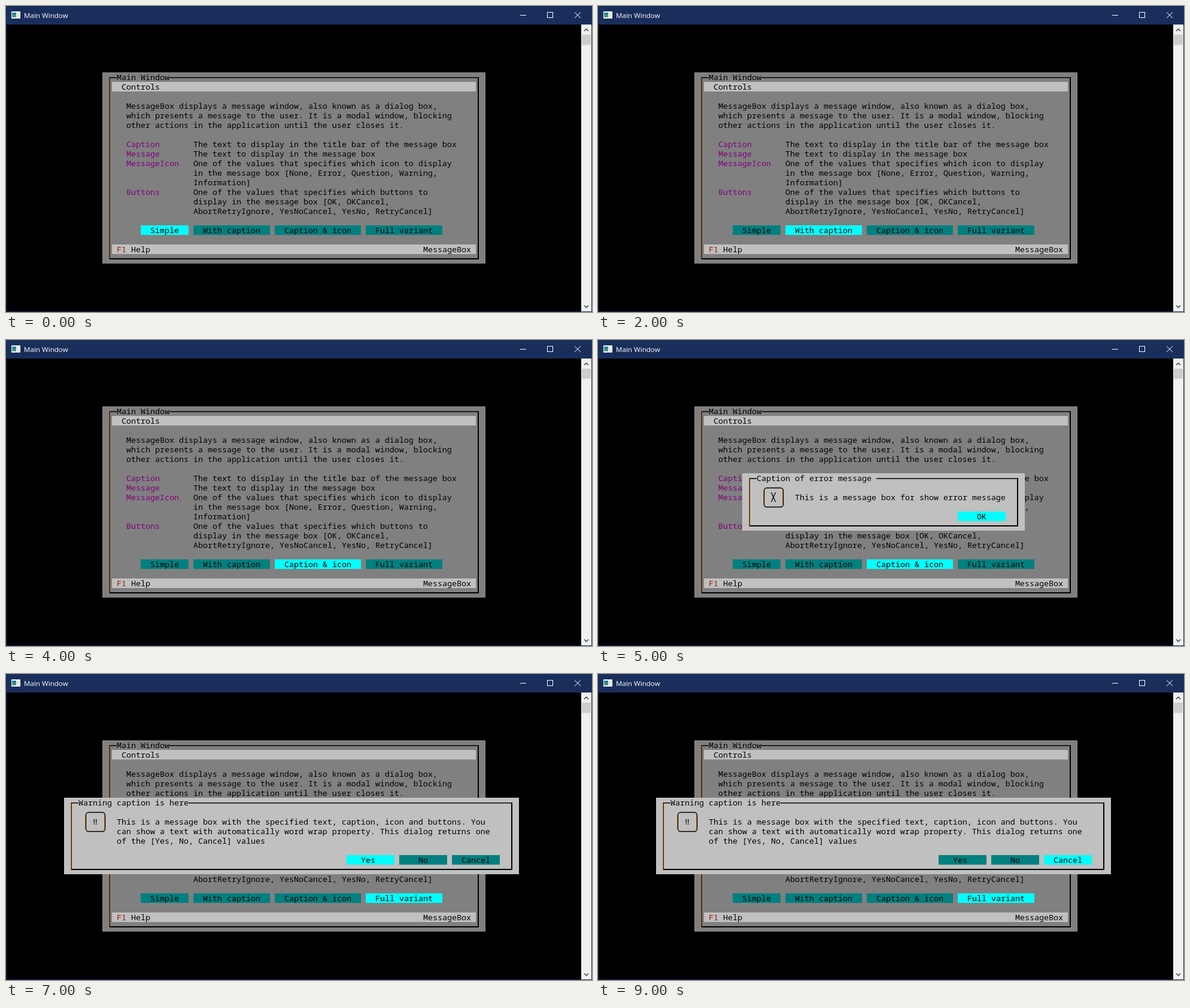
An HTML page that plays this animation: 979 px wide and 512 px high, repeating every 10 s.

```html
<!DOCTYPE html>
<html lang="en">
<head>
<meta charset="utf-8">
<title>Main Window</title>
<style>
  html, body { margin: 0; width: 100%; height: 100%; overflow: hidden; background: #000; }
  svg { display: block; }
  text { font: 13.333px "Noto Sans Mono", "DejaVu Sans Mono", monospace; white-space: pre; }
  .title { font: 11.6px "Open Sans", "Noto Sans", sans-serif; }
</style>
</head>
<body>
<svg id="stage" width="979" height="512" viewBox="0 0 979 512">
  <rect width="979" height="512" fill="#1a2e5c"/>
  <rect x="1" y="31" width="960" height="480"/>
  <g id="icon">
    <rect x="9" y="9" width="15" height="12" fill="#f4f6f8"/>
    <rect x="10" y="11" width="7" height="8" fill="#2f7f9c"/>
    <rect x="10" y="15" width="7" height="4" fill="#4a9a78"/>
    <path d="M18 12.5h5M18 15.5h5M18 18.5h5" stroke="#c3cad2"/>
  </g>
  <text class="title" x="30" y="20" fill="#fff">Main Window</text>
  <g fill="none" stroke="#fff">
    <path d="M859 15.5h10"/>
    <rect x="904.5" y="10.5" width="9" height="9"/>
    <path d="M950 10.5l10 9.6M960 10.5l-10 9.6"/>
  </g>
  <rect x="961" y="31" width="17" height="480" fill="#f0f0f0"/>
  <rect x="962" y="48" width="15" height="17" fill="#cdcdcd"/>
  <path d="M966 42l3.5-3.5 3.5 3.5M966 501l3.5 3.5 3.5-3.5" fill="none" stroke="#505050" stroke-width="1.7"/>
</svg>
<script>
const stage = document.getElementById('stage');
const GRAY = '#808080', SILVER = '#c0c0c0', TEAL = '#008080', CYAN = '#00ffff', PURPLE = '#800080';
const COLS = 120, ROWS = 30;
const px = col => 1 + 8 * col;
const py = row => 31 + 16 * row;

function add(parent, tag, attrs = {}) {
  const el = document.createElementNS(stage.namespaceURI, tag);
  for (const key in attrs) el.setAttribute(key, attrs[key]);
  return parent.appendChild(el);
}
const box = (parent, x, y, width, height, fill) => add(parent, 'rect', { x, y, width, height, fill });
const cells = (parent, col, row, w, h, fill) => box(parent, px(col), py(row), 8 * w, 16 * h, fill);

function print(parent, col, row, text, fill = '#000') {
  add(parent, 'text', { x: px(col), y: py(row) + 13, fill }).textContent = text;
}

function button(parent, col, row, width, label) {
  const face = cells(parent, col, row, width, 1, TEAL);
  print(parent, col + Math.floor((width - label.length) / 2), row, label);
  return face;
}

// Panel with a light top and left edge, a heavy bottom and right edge.
function panel(parent, col, row, w, h, fill, title) {
  cells(parent, col, row, w, h, fill);
  const left = px(col) + 12, top = py(row) + 8;
  const right = px(col + w) - 12, bottom = py(row + h) - 8;
  const edge = fill === GRAY ? '#804a00' : '#c07000';
  const titleEnd = title ? px(col + 3 + title.length) : left;
  box(parent, left - 1, top, 1, bottom - top + 1, edge);
  box(parent, left, top, 1, bottom - top + 1, '#301c00');
  if (title) box(parent, left, top, 12, 1.5, '#000');
  box(parent, titleEnd, top, right - titleEnd + 1, 1.5, '#000');
  box(parent, right - 1, top, 2, bottom - top + 1, '#000');
  box(parent, left, bottom - 1, right - left + 1, 2, '#000');
  print(parent, col + 3, row, title);
}

function messageIcon(parent, col, row, kind) {
  const x = px(col) + 4, y = py(row) + 8;
  add(parent, 'rect', { x: x + .5, y: y + .5, width: 32, height: 32, rx: 4.5,
    fill: 'none', stroke: '#000', 'stroke-width': 1.4 });
  box(parent, x - 1, y + 5, 1, 23, '#c07000');
  box(parent, x + 31, y + 5, 1, 23, '#c07000');
  if (kind === 'error') {
    add(parent, 'path', { d: `M${x + 12.5} ${y + 8}l7 16m0-16l-7 16`,
      stroke: '#000', 'stroke-width': 1.3 });
  } else {
    print(parent, col + 2, row + 1, '‼');
  }
}

function dialog({ title = '', lines, icon, buttons = ['OK'] }) {
  const g = add(stage, 'g');
  const indent = icon ? 11 : 4;
  const w = icon === 'warning' ? 95 : indent + lines[0].length + 4;
  const h = lines.length + 5;
  const col = Math.floor((COLS - w) / 2), row = Math.floor((ROWS - h) / 2);
  panel(g, col, row, w, h, SILVER, title);
  if (icon) messageIcon(g, col + 4, row + 1, icon);
  lines.forEach((line, i) => print(g, col + indent, row + 2 + i, line));
  const start = col + w - 3 - 11 * buttons.length;
  const faces = buttons.map((label, i) => button(g, start + 11 * i, row + h - 2, 10, label));
  return { g, faces };
}

panel(stage, 20, 5, 80, 20, GRAY, 'Main Window');
cells(stage, 22, 6, 76, 1, SILVER);
cells(stage, 22, 23, 76, 1, SILVER);
print(stage, 24, 6, 'Controls');
print(stage, 23, 23, 'F1', '#902000');
print(stage, 26, 23, 'Help');
print(stage, 87, 23, 'MessageBox');

[
  'MessageBox displays a message window, also known as a dialog box,',
  'which presents a message to the user. It is a modal window, blocking',
  'other actions in the application until the user closes it.'
].forEach((line, i) => print(stage, 25, 8 + i, line));

[
  ['Caption', 'The text to display in the title bar of the message box'],
  ['Message', 'The text to display in the message box'],
  ['MessageIcon', 'One of the values that specifies which icon to display'],
  ['', 'in the message box [None, Error, Question, Warning,'],
  ['', 'Information]'],
  ['Buttons', 'One of the values that specifies which buttons to'],
  ['', 'display in the message box [OK, OKCancel,'],
  ['', 'AbortRetryIgnore, YesNoCancel, YesNo, RetryCancel]']
].forEach(([name, about], i) => {
  if (name) print(stage, 25, 12 + i, name, PURPLE);
  print(stage, 39, 12 + i, about);
});

let nextCol = 28;
const menu = ['Simple', 'With caption', 'Caption & icon', 'Full variant'].map(label => {
  const face = button(stage, nextCol, 21, label.length + 4, label);
  nextCol += label.length + 5;
  return face;
});

const dialogs = [
  { lines: ['This is a simple message dialog'] },
  { title: 'Caption of message', lines: ['This is a message box with a given caption'] },
  { title: 'Caption of error message ', icon: 'error',
    lines: ['This is a message box for show error message'] },
  { title: 'Warning caption is here', icon: 'warning', buttons: ['Yes', 'No', 'Cancel'],
    lines: [
      'This is a message box with the specified text, caption, icon and buttons. You',
      'can show a text with automatically word wrap property. This dialog returns one',
      'of the [Yes, No, Cancel] values'
    ] }
].map(dialog);

// One second per step: [focused menu button, focused dialog button or -1 when closed]
const STEPS = [[0, -1], [0, 0], [1, -1], [1, 0], [2, -1], [2, 0], [3, -1], [3, 0], [3, 1], [3, 2]];
const focus = (faces, index) =>
  faces.forEach((face, i) => face.setAttribute('fill', i === index ? CYAN : TEAL));

let shown = -1;
function show(step) {
  if (step === shown) return;
  shown = step;
  const [item, choice] = STEPS[step];
  focus(menu, item);
  dialogs.forEach(({ g, faces }, i) => {
    g.style.display = i === item && choice >= 0 ? '' : 'none';
    focus(faces, choice);
  });
}

const start = performance.now();
function tick() {
  show(Math.floor((performance.now() - start) / 1000) % STEPS.length);
  requestAnimationFrame(tick);
}
tick();
</script>
</body>
</html>
```
